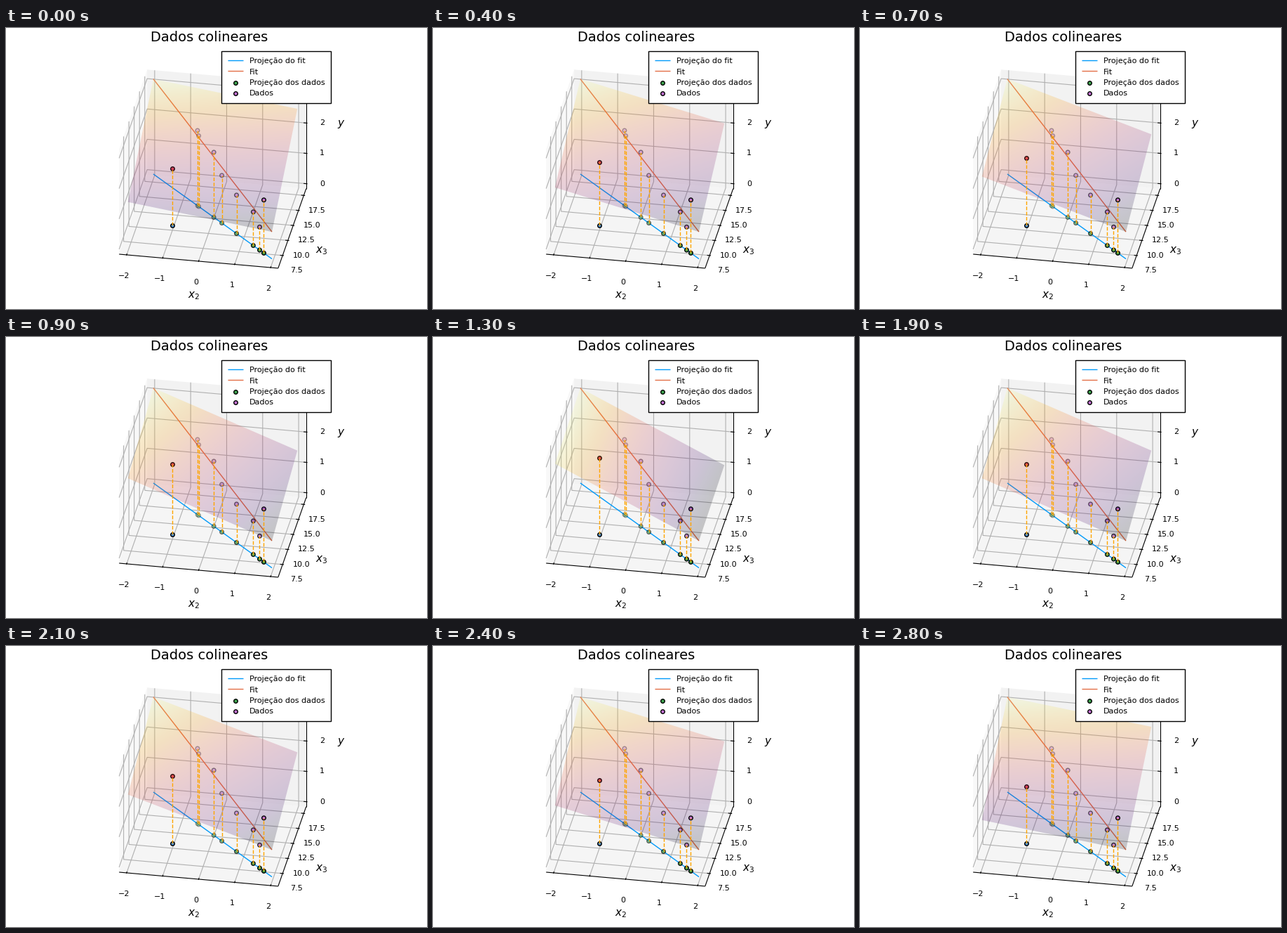
Recreate the animation shown at these times as a matplotlib script. Size 600 px wide and 400 px high, loop 2900 ms.

```python
import matplotlib.pyplot as plt
import numpy as np
from matplotlib.animation import FuncAnimation
from matplotlib.colors import to_rgba
from matplotlib.patches import Polygon, Rectangle
from matplotlib.path import Path

W, H = 600, 400
STEPS = 14

# Orthographic camera: elevation 30, azimuth -80, box of 4:4:3
CENTER = np.array([294.5, 200.6])
SIDE = 230.1
TURN, TILT = np.radians(10), np.radians(30)
MID = np.array([0, 12, 1.567])
RANGE = np.array([4, 12, 3.134]) * 1.06 * 25 / 24
LOW, HIGH = MID - RANGE / 2, MID + RANGE / 2
AXES = SIDE * np.array([
    [np.cos(TURN), np.sin(TURN) * np.sin(TILT)],
    [np.sin(TURN), -np.cos(TURN) * np.sin(TILT)],
    [0, -0.75 * np.cos(TILT)],
])
TOWARD = np.array([np.sin(TURN) * np.cos(TILT),
                   -np.cos(TURN) * np.cos(TILT),
                   0.75 * np.sin(TILT)])

# Fit line: x3 = 12 - 3 x2, y = FIT_MEAN + FIT_SLOPE x2
FIT_MEAN, FIT_SLOPE = 2.012, -0.561
BLUE, RUST, GREEN, PURPLE = "#009afa", "#e36f47", "#3ea44e", "#c371d2"
RED_DOT, BLUE_DOT = "#e04858", "#4a90d6"
INFERNO = plt.get_cmap("inferno")
SURFACE_ALPHA = 0.2

data_x = np.array([-0.51, -0.47, 0.04, 0.31, 0.805, 1.37, 1.585, 1.727])
data_y = np.array([2.477, 2.33, 2.144, 1.569, 1.266, 1.107, 0.759, 1.75])


def unit(p):
    return (np.asarray(p, float) - MID) / RANGE


def project(p):
    return CENTER + unit(p) @ AXES


def depth(p):
    return unit(p) @ TOWARD


def plane(x2, x3, tilt):
    return FIT_MEAN + (FIT_SLOPE + 3 * tilt) * x2 + tilt * (x3 - 12)


fig = plt.figure(figsize=(W / 100, H / 100), dpi=100, facecolor="white")
ax = fig.add_axes([0, 0, 1, 1])
ax.axis("off")


def line(points, color, width=1.0, order=3, **style):
    xy = np.asarray(points)
    return ax.plot(xy[:, 0], xy[:, 1], color=color, lw=width, zorder=order,
                   solid_capstyle="butt", **style)[0]


def line3(points, *args, **style):
    return line([project(p) for p in points], *args, **style)


def stem(foot, top):
    return line3([foot, top], "orange", order=9, ls="--")


def dots(points, color, order):
    """Round markers that fade with their distance from the camera."""
    points = np.atleast_2d(points)
    d = depth(points)
    span = np.ptp(d)
    alpha = 1 - 0.7 * (d.max() - d) / span if span else np.ones(len(d))
    xy = project(points)
    return ax.scatter(xy[:, 0], xy[:, 1], s=16, lw=1, zorder=order,
                      facecolors=[to_rgba(color, a) for a in alpha],
                      edgecolors=[(0, 0, 0, a) for a in alpha])


def label(x, y, text, size=8, ha="center", va="center", order=3):
    ax.text(x, y, text, fontsize=size, ha=ha, va=va, zorder=order,
            family="DejaVu Sans")


def pane(corners, grey):
    ax.add_patch(Polygon([project(c) for c in corners], facecolor=str(grey),
                         alpha=0.5, lw=0, zorder=1))


def tick(at, direction):
    step = AXES[direction] * 0.96 / 12
    inward = 1 if direction == 1 else -1
    p = project(at)
    line([p + 0.2 * inward * step, p - 0.1 * inward * step], "black", 0.8)


def draw_box():
    (x0, y0, z0), (x1, y1, z1) = LOW, HIGH
    pane([(x0, y0, z0), (x0, y1, z0), (x0, y1, z1), (x0, y0, z1)], 0.95)
    pane([(x0, y1, z0), (x1, y1, z0), (x1, y1, z1), (x0, y1, z1)], 0.90)
    pane([(x0, y0, z0), (x1, y0, z0), (x1, y1, z0), (x0, y1, z0)], 0.925)

    grid = ("#b0b0b0", 0.8, 2)
    for v in range(-2, 3):
        line3([(v, y0, z0), (v, y1, z0), (v, y1, z1)], *grid)
        tick((v, y0, z0), 1)
        x, y = project((v, y0, z0))
        label(x - 3.8, y + 29.7, str(v).replace("-", "\u2212"))
    for v in np.arange(7.5, 18, 2.5):
        line3([(x1, v, z0), (x0, v, z0), (x0, v, z1)], *grid)
        tick((x1, v, z0), 0)
        x, y = project((x1, v, z0))
        label(x + 19.3, y + 21.3, f"{v:.1f}")
    for v in range(4):
        line3([(x0, y0, v), (x0, y1, v), (x1, y1, v)], *grid)
        tick((x1, y1, v), 0)
        x, y = project((x1, y1, v))
        if v < 3:
            label(x + 23, y, str(v))

    corners = [(x0, y0, z0), (x1, y0, z0), (x1, y1, z0), (x1, y1, z1)]
    for a, b in zip(corners, corners[1:]):
        line3([a, b], "black", 0.8)
    label(268, 381, "$x_2$", 11)
    label(449.6, 317, "$x_3$", 11)
    label(477.5, 137, "$y$", 11)
    label(289.5, 19, "Dados colineares", 14, va="baseline")


def draw_legend():
    ax.add_patch(Rectangle((306.9, 32.7), 156, 74.3, facecolor="white",
                           edgecolor="black", lw=1, zorder=10))
    names = ["Projeção do fit", "Fit", "Projeção dos dados", "Dados"]
    for i, (name, color) in enumerate(zip(names, [BLUE, RUST, GREEN, PURPLE])):
        y = 46 + 15.4 * i
        if i < 2:
            line([(315.9, y), (338.1, y)], color, order=11)
        else:
            ax.scatter([327], [y + 0.9], s=16, lw=1, facecolors=color,
                       edgecolors="black", zorder=11)
        label(346.8, y + 4.3, name, ha="left", va="baseline", order=11)


draw_box()
draw_legend()

ends = [(x, 12 - 3 * x) for x in (-2, 2)]
line3([(x, x3, 0) for x, x3 in ends], BLUE, order=4)
line3([(x, x3, FIT_MEAN + FIT_SLOPE * x) for x, x3 in ends], RUST, order=4)

data_x3 = 12 - 3 * data_x
feet = np.column_stack([data_x, data_x3, 0 * data_x])
tops = np.column_stack([data_x, data_x3, data_y])
for foot, top in zip(feet, tops):
    stem(foot, top)
dots(feet, GREEN, 6)
data_dots = dots(tops, PURPLE, 8)

stray = (-1, 10)
stray_foot = (*stray, 0)
stray_stem = stem(stray_foot, stray_foot)
dots(stray_foot, BLUE_DOT, 6)
stray_dot = dots(stray_foot, RED_DOT, 6)

pixels = np.stack(np.meshgrid(np.arange(W) + 0.5, np.arange(H) + 0.5), axis=-1)
surface = ax.imshow(np.zeros((H, W, 4)), extent=(0, W, H, 0), aspect="auto",
                    interpolation="nearest", zorder=7)
ax.set_xlim(0, W)
ax.set_ylim(H, 0)


def draw(frame):
    k = min(frame, 2 * STEPS - frame)
    tilt = 0.01 * (STEPS - k)

    corners = np.array([(x, y, plane(x, y, tilt))
                        for x, y in ((-2, 18), (2, 18), (2, 6), (-2, 6))])
    quad = project(corners)
    heights = corners[:, 2]

    # Height is linear on screen, so the colour follows from three corners
    basis = np.column_stack([quad[1] - quad[0], quad[3] - quad[0]])
    uv = (pixels - quad[0]) @ np.linalg.inv(basis).T
    z = heights[0] + uv @ (heights[[1, 3]] - heights[0])
    rgba = INFERNO(np.clip((z - heights[2]) / (heights[0] - heights[2]), 0, 1))
    rgba[..., 3] = SURFACE_ALPHA
    surface.set_data(rgba)
    surface.set_clip_path(Path(np.vstack([quad, quad[:1]])), ax.transData)

    # The nearer of the plane and the data is painted last
    in_front = depth(tops).max() > depth(corners).max()
    data_dots.set_zorder(8 if in_front else 6.5)

    top = project((*stray, plane(*stray, tilt)))
    stray_dot.set_offsets([top])
    stray_stem.set_data(*zip(project(stray_foot), top))
    return surface, data_dots, stray_dot, stray_stem


anim = FuncAnimation(fig, draw, frames=2 * STEPS + 1, interval=100,
                     repeat=True, repeat_delay=0, blit=False)
plt.show()
```
